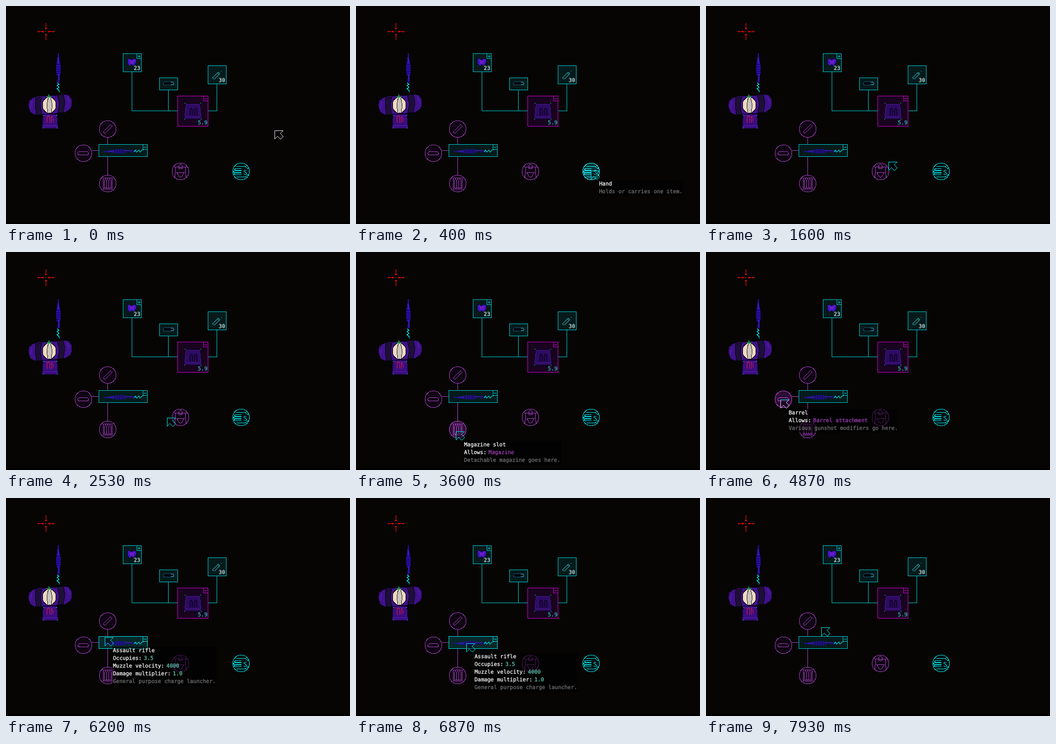
Animation of 624x396 px, one loop 8000 ms. Source, as an HTML page:

```html
<!DOCTYPE html>
<html lang="en">
<head>
<meta charset="utf-8">
<title>Equipment screen</title>
<style>
html, body { margin: 0; width: 100%; height: 100%; overflow: hidden; background: #000; }
svg { display: block; width: 624px; height: 396px; fill: none; stroke-width: 1; shape-rendering: crispEdges; }
text { font: 9.69px "DejaVu Sans Mono", "Liberation Mono", monospace; text-rendering: geometricPrecision; fill: currentColor; stroke: currentColor; stroke-width: .25; white-space: pre; }
.cyan { stroke: #00b6ba; }
.box { fill: #061a1b; }
.slot { stroke: #943aaa; }
.slot circle { fill: #0f0513; }
.hand { stroke: #00ced4; }
.hand circle { fill: #03100f; }
.slot.on { stroke: #a945c0; }
.slot.on > circle { fill: #2c0d36; }
.hand.on { stroke: #20e6ec; }
.hand.on > circle { fill: #08363a; }
.gun.on { stroke: #00d0d4; }
.gun.on > .box { fill: #06292b; }
.title { color: #fff; }
.kind { color: #a040bc; }
.num { color: #62cdb6; }
.note { color: #747474; }
</style>
</head>
<body>
<svg viewBox="0 0 624 396">
  <defs>
    <g id="rifle" stroke="none">
      <path fill="#2a0cae" d="M0-1H11V-2H17V-3H22V-4H38V-3H41V-2H55V2H47V1H41V3H36V4H22V3H15V2H7V1H0Z"/>
      <path stroke="#10063f" d="M20.5-3V3M25.5-4V4M29.5-4V4M33.5-4V4M37.5-3V3M41 .5H54"/>
      <path stroke="#4a28e8" d="M8-.5H19M39-1.5H52"/>
      <path stroke="#00e0e2" stroke-width="1.5" d="M55 1.500L58-1.500L60 1.500L64-1.500L66 1.500L70-2L73-2"/>
    </g>
    <g id="pack">
      <path fill="#3a0d80" stroke="#13052c" d="M2 0H27L29 26H0Z"/>
      <path stroke="#5320a2" d="M3 2.500H26M2 20.500H27"/>
    </g>
  </defs>

  <rect width="624" height="392" fill="#060504"/>

  <!-- crosshair -->
  <g stroke="#f40808">
    <path d="M57 46.500H68M77 46.500H88M72.500 31V42M72.500 51V62M71 46.500H73"/>
    <path stroke-width="3" d="M66 46.500H68M77 46.500H79M72.500 40V42M72.500 51V53M59 46.500H60M85 46.500H86"/>
  </g>

  <!-- character -->
  <use href="#rifle" transform="translate(94.500 86) rotate(90) scale(.97 1)"/>
  <g stroke="#090212">
    <use href="#pack" x="65.500" y="196.500"/>
    <path fill="#3f118a" d="M40 181L42 172L48 167L58 164L92 162L106 160L114 162L119 169L120 179L117 187L108 193L92 195L66 197L52 198L44 193Z"/>
    <path stroke="#5a1fae" d="M44 187L47 173M111 165L116 176"/>
    <path fill="#1d0f38" d="M54 167L65 165L62 180L65 198L55 197L53 181ZM93 162L104 160L107 175L104 193L94 194L97 178Z"/>
    <ellipse cx="78.500" cy="180" rx="12.500" ry="14.500" fill="#ecd9c0"/>
    <path stroke="none" fill="#c9c4bd" d="M77 167H81L83 180L81 194H77L75 180Z"/>
    <path stroke="#3a2c2c" d="M76.500 167L74 180L76 193M81 167L84 180L82 193"/>
    <path stroke="#18a83c" d="M73 164L78 166L83 164M77.500 160V167M78.500 162V167"/>
    <path stroke="#d31838" d="M74.500 212V202L77 199L79.500 203V212M82.500 212V201L85 204V210"/>
    <path stroke="#10a0a8" d="M67 198H69M91 198H93M67 221H69M92 221H94"/>
  </g>

  <!-- inventory tree -->
  <g class="cyan">
    <path d="M228.500 120V190.500H311M294.500 153V190M382.500 142V190.500H367"/>
    <path class="box" d="M212.500 86.500h33v33h-33zM278.500 130.500h33v22h-33zM366.500 108.500h33v33h-33z"/>
    <path d="M237.500 87V95.500H245M239 91.500H244M241.500 89V94"/>
    <rect x="285.500" y="137.500" width="19" height="6" rx="3" fill="#050608" stroke="#1c4a68"/>
    <path stroke="#2390a0" d="M299 138.500H303L304.500 140.500L303 142.500H299"/>
    <g transform="translate(382 126) rotate(-45)" stroke="#2cc4ca">
      <rect x="-8.500" y="-2" width="15" height="4" fill="#082628"/>
      <path d="M4 -3V3M10 0H12"/>
    </g>
  </g>
  <path fill="#3d17c4" stroke="#160638" d="M220 97L224 95L228 98L232 95L236 97V103L233 108H230L228 106L226 108H223L220 103Z"/>
  <path stroke="#a81cb8" d="M224 98L226.500 101V105M233 98L230.500 101V105M228.500 99V104"/>
  <rect x="311.500" y="163.500" width="55" height="55" fill="#18041e" stroke="#bc00b4"/>
  <path stroke="#bc00b4" d="M358.500 164V172.500H366M360 168.500H365"/>
  <path fill="#2d0b62" stroke="#0c031c" d="M326 177H352L355 205H323Z"/>
  <path stroke="#451888" d="M327 178.500H351M324 201.500H354M326.500 180L324.500 200M351.500 180L353.500 200"/>
  <path fill="#230850" stroke="#08010f" d="M333.500 199V188L336 185L338.500 189V199M341.500 199V189L344 185L346.500 188V199"/>
  <path stroke="#10a0a8" d="M324 176.500H326M352 176.500H354M323 205.500H325M353 205.500H355"/>
  <g text-anchor="end" color="#cfe6e6">
    <text x="243.500" y="116">23</text>
    <text x="397.500" y="138">30</text>
    <text x="365.500" y="215" color="#30bcc0">5.9</text>
  </g>

  <!-- weapon and its slots -->
  <g class="slot">
    <path d="M184.500 239V251"/>
    <circle cx="184.500" cy="223.500" r="15.300"/>
    <rect x="-9.500" y="-2" width="19" height="4" rx="1" transform="translate(184.500 223.500) rotate(-45)"/>
  </g>
  <g class="slot" id="barrel">
    <path d="M156 262.500H168"/>
    <circle cx="140.500" cy="267.500" r="15.300"/>
    <rect x="130.500" y="264.500" width="19" height="6" rx="3"/>
  </g>
  <g class="slot" id="magazine">
    <path d="M184.500 274V307"/>
    <circle cx="184.500" cy="322.500" r="15.300"/>
    <path d="M176.500 312.500H192.500V332.500H176.500ZM178.500 330V317L180.500 314L182.500 317V330ZM182.500 330V317L184.500 314L186.500 317V330ZM186.500 330V317L188.500 314L190.500 317V330Z"/>
  </g>
  <g class="cyan gun" id="gun">
    <rect class="box" x="168.500" y="251.500" width="88" height="22"/>
    <path d="M248.500 252V260.500H256M250 256.500H255"/>
    <use href="#rifle" x="177" y="263.500" opacity=".7"/>
  </g>
  <g class="slot" id="armor">
    <circle cx="316.500" cy="300.500" r="15.300"/>
    <path d="M304.500 292.500H312L314 295.500H319L321 292.500H328.500M307.500 293V300L306.500 311M325.500 293V300L326.500 311M310 302.500H323L319.500 309L316.500 311.500L313.500 309Z"/>
    <circle cx="316.500" cy="290.500" r="3"/>
  </g>
  <g class="hand" id="hand">
    <circle cx="426.500" cy="300.500" r="15.300"/>
    <path d="M418 291.500H434L440 296M427 295.500H416L414.500 297L416 298.500H427M427 299.500H414L412.500 301L414 302.500H427M427 303.500H415L413.500 305L415 306.500H427M418 310.500H434L440 306"/>
    <path d="M436 298.500H432.500L431.500 300L436 303V305.500H431"/>
  </g>

  <g id="tip"></g>
  <g id="cursor">
    <path id="body" fill="#000" fill-opacity=".35" d="M.5 .5H15.500L10.500 5.500L16 11L11 16L5.500 10.500L.5 15.500Z"/>
    <path id="edge" d="M0 .5H15"/>
  </g>
</svg>
<script>
const LOOP = 8000, TICK = 1000 / 15, ADVANCE = 5.833;
const $ = id => document.getElementById(id);

const disc = (cx, cy) => (x, y) => Math.hypot(x - cx, y - cy) <= 16;
const slot = (title, kind, note) => [["title", title], ["kind", "Allows:", kind], ["note", note]];

const targets = [
  { id: "hand", hit: disc(426.5, 300.5),
    lines: [["title", "Hand"], ["note", "Holds or carries one item."]] },
  { id: "armor", hit: disc(316.5, 300.5),
    lines: slot("Armor slot", "Armor", "Protective gear goes here.") },
  { id: "magazine", hit: disc(184.5, 322.5),
    lines: slot("Magazine slot", "Magazine", "Detachable magazine goes here.") },
  { id: "barrel", hit: disc(140.5, 267.5),
    lines: slot("Barrel", "Barrel attachment", "Various gunshot modifiers go here.") },
  { id: "gun", hit: (x, y) => x >= 168 && x <= 257 && y >= 251 && y <= 274,
    lines: [["title", "Assault rifle"], ["num", "Occupies:", "3.5"],
      ["num", "Muzzle velocity:", "4000"], ["num", "Damage multiplier:", "1.0"],
      ["note", "General purpose charge launcher."]] }
];

// Pointer path: tick, x, y
const path = [
  [0, 487, 226], [1, 481, 234], [4, 439, 283], [6, 426, 299],
  [19, 426, 299], [20, 416, 290], [22, 372, 276], [24, 331, 283], [27, 318, 293],
  [29, 318, 293], [31, 316, 295],
  [36, 316, 295], [38, 292, 301], [41, 212, 320], [44, 182, 326],
  [53, 182, 326], [54, 181, 326], [57, 174, 317], [62, 146, 277], [66, 138, 269],
  [68, 138, 269], [71, 137, 269], [72, 137, 269], [73, 135, 268],
  [87, 135, 268], [89, 143, 263], [93, 179, 253], [95, 185, 255],
  [96, 185, 255], [103, 200, 264],
  [113, 200, 264], [116, 211, 257], [119, 209, 235], [120, 209, 235]
];

function pointer(tick) {
  const i = path.findIndex(p => p[0] > tick);
  const [t0, x0, y0] = path[i - 1], [t1, x1, y1] = path[i];
  const k = (tick - t0) / (t1 - t0);
  return [Math.round(x0 + (x1 - x0) * k), Math.round(y0 + (y1 - y0) * k)];
}

function tipMarkup(lines) {
  const width = Math.max(...lines.map(l => l.slice(1).join(" ").length)) * ADVANCE;
  const rows = lines.map(([style, label, value], i) => {
    const y = 27 + i * 14;
    const text = (x, cls, s) => `<text x="${x}" y="${y}" class="${cls}">${s}</text>`;
    return value
      ? text(15, "title", label) + text(18.5 + label.length * ADVANCE, style, value)
      : text(15, style, label);
  });
  return `<rect x="14" y="17" width="${Math.round(width + 2)}" height="${lines.length * 14 + 1}" fill="#000" fill-opacity=".58"/>` + rows.join("");
}

for (const t of targets) {
  t.node = $(t.id);
  t.markup = tipMarkup(t.lines);
}

let shown = null;

function draw(ms) {
  const tick = Math.floor(((ms % LOOP) + 4) / TICK) % 120;
  const [x, y] = pointer(tick);
  const over = targets.find(t => t.hit(x, y)) || null;
  if (over !== shown) {
    for (const t of targets) t.node.classList.toggle("on", t === over);
    $("tip").innerHTML = over ? over.markup : "";
    shown = over;
  }
  for (const id of ["tip", "cursor"]) $(id).setAttribute("transform", `translate(${x} ${y})`);
  const resting = tick === 0 || (tick >= 73 && tick < 88);
  $("body").setAttribute("stroke", resting ? "#cfcbd8" : "#00d5da");
  $("edge").setAttribute("stroke", tick === 0 ? "#cfcbd8" : "#00d5da");
}

const start = performance.now();
function loop() {
  draw(performance.now() - start);
  requestAnimationFrame(loop);
}
loop();
</script>
</body>
</html>
```
